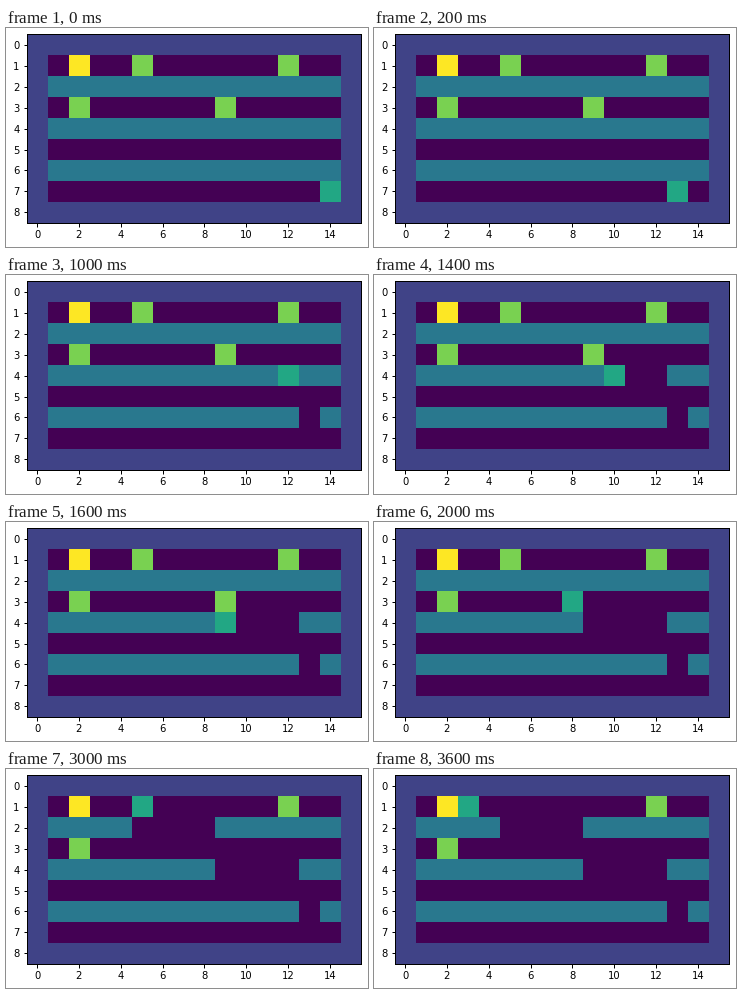
Animation, 362 px wide and 219 px high, one loop 4 s. Source, as a matplotlib script:

```python
import numpy as np
import matplotlib.pyplot as plt
from matplotlib.animation import FuncAnimation

W, H, DPI = 362, 219, 72
CELL = 334.8 / 16
ROWS, COLS = 9, 16
LEFT, TOP = 20.6, 6.45
FLOOR, BORDER, WALL, AGENT, GEM, GOAL = range(6)

# Agent moves, one per step; "." means it waits
MOVES = "LUULULLLULULLLUL.L."
STEPS = {"L": (0, -1), "U": (-1, 0), ".": (0, 0)}


def start_grid():
    grid = np.full((ROWS, COLS), BORDER)
    grid[1:-1, 1:-1] = FLOOR
    grid[2:7:2, 1:-1] = WALL
    for row, col in [(1, 5), (1, 12), (3, 2), (3, 9)]:
        grid[row, col] = GEM
    grid[1, 2] = GOAL
    return grid


def grid_at(step):
    """Clear every visited cell and place the agent on the last one."""
    grid = start_grid()
    row, col = 7, 14
    for move in MOVES[:step]:
        grid[row, col] = FLOOR
        dr, dc = STEPS[move]
        row, col = row + dr, col + dc
    grid[row, col] = AGENT
    return grid


plt.rcParams.update({"font.family": "DejaVu Sans", "font.size": 10,
                     "axes.linewidth": 1, "xtick.major.width": 1,
                     "ytick.major.width": 1})
fig = plt.figure(figsize=(W / DPI, H / DPI), dpi=DPI, facecolor="white")
width, height = COLS * CELL, ROWS * CELL
ax = fig.add_axes([LEFT / W, 1 - (TOP + height) / H, width / W, height / H])
image = ax.imshow(grid_at(0), cmap="viridis", vmin=FLOOR, vmax=GOAL,
                  interpolation="nearest", aspect="auto")
ax.set_xticks(range(0, COLS, 2))
ax.set_yticks(range(ROWS))


def update(step):
    image.set_data(grid_at(step))
    return [image]


anim = FuncAnimation(fig, update, frames=len(MOVES) + 1, interval=200,
                     repeat=True, repeat_delay=0, blit=False)
plt.show()
```
